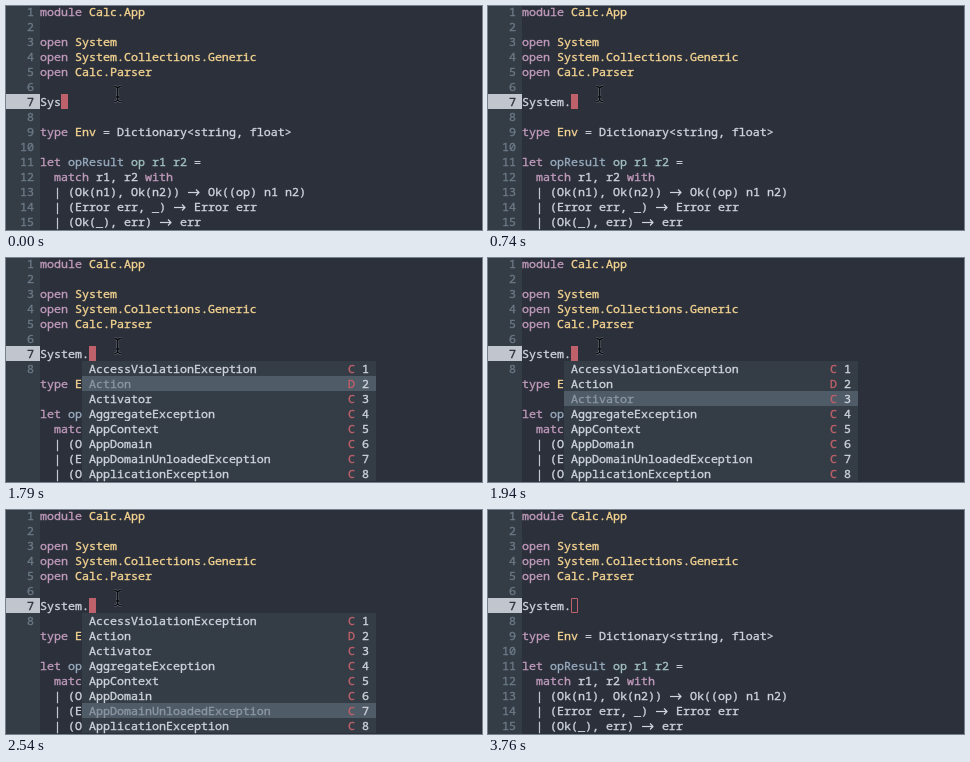
Write an HTML page with a canvas that moves like this. It is 476x224 px and loops after 3860 ms.

```html
<!DOCTYPE html>
<html lang="en">
<head>
<meta charset="utf-8">
<title>Code completion</title>
<style>
  html, body { margin: 0; width: 100%; height: 100%; overflow: hidden; background: #2b303b; }
  canvas { display: block; width: 476px; height: 224px; }
</style>
</head>
<body>
<canvas id="stage"></canvas>
<script>
const W = 476, H = 224, LOOP = 3860;
const COL = 7, ROW = 15, LEFT = 34, TOP = -2;
const FONT = '11.667px "Noto Sans Mono", "DejaVu Sans Mono", monospace';
const C = {
  bg: '#2b303b', gutter: '#343d46', fg: '#ced3dc', num: '#6b7985',
  key: '#c09abb', type: '#f5d491', fn: '#98abbe', arg: '#a3c1c0', red: '#bf616a',
  line: '#c0c5ce', menu: '#343d46', pick: '#4f5b66', dim: '#8c97a3'
};

// Each line is a list of [colour, text] runs.
const key = s => ['key', s], type = s => ['type', s], fg = s => ['fg', s];
const code = [
  [key('module '), type('Calc.App')],
  [],
  [key('open '), type('System')],
  [key('open '), type('System.Collections.Generic')],
  [key('open '), type('Calc.Parser')],
  [],
  [],
  [],
  [key('type '), type('Env'), fg(' = Dictionary<string, float>')],
  [],
  [key('let '), ['fn', 'opResult'], ['arg', ' op r1 r2'], fg(' =')],
  [key('  match'), fg(' r1, r2 '), key('with')],
  [fg('  | (Ok(n1), Ok(n2)) -> Ok((op) n1 n2)')],
  [fg('  | (Error err, _) -> Error err')],
  [fg('  | (Ok(_), err) -> err')]
];

const short = [['System', 'N'], ['SystemException', 'C']];
const members = [
  ['AccessViolationException', 'C'], ['Action', 'D'], ['Activator', 'C'],
  ['AggregateException', 'C'], ['AppContext', 'C'], ['AppDomain', 'C'],
  ['AppDomainUnloadedException', 'C'], ['ApplicationException', 'C']
];

const canvas = document.getElementById('stage');
const ctx = canvas.getContext('2d');
const dpr = window.devicePixelRatio || 1;
canvas.width = W * dpr;
canvas.height = H * dpr;

const lineTop = n => TOP + (n - 1) * ROW;

function rect(color, x, y, w, h) {
  ctx.fillStyle = color;
  ctx.fillRect(x, y, w, h);
}

// A hairline outline gives the type its medium weight.
function text(color, s, x, top) {
  ctx.fillStyle = ctx.strokeStyle = color;
  ctx.lineWidth = 0.35;
  ctx.fillText(s, x, top + 12);
  ctx.strokeText(s, x, top + 12);
}

function path(points, close) {
  ctx.beginPath();
  for (const [x, y] of points) ctx.lineTo(x, y);
  if (close) ctx.closePath();
}

function arrowGlyph(x, top) {
  const y = top + 8.5;
  ctx.strokeStyle = C.fg;
  ctx.lineWidth = 1.2;
  path([[x + 1, y], [x + 12, y]]);
  ctx.stroke();
  path([[x + 9, y - 3], [x + 12, y], [x + 9, y + 3]]);
  ctx.stroke();
}

function drawLine(runs, top) {
  let x = LEFT;
  for (const [color, s] of runs) {
    const at = s.indexOf('->');
    if (at < 0) {
      text(C[color], s, x, top);
    } else {
      text(C[color], s.slice(0, at), x, top);
      arrowGlyph(x + at * COL, top);
      text(C[color], s.slice(at + 2), x + (at + 2) * COL, top);
    }
    x += s.length * COL;
  }
}

function drawEditor(typed, menuOpen, focused) {
  rect(C.bg, 0, 0, W, H);
  rect(C.gutter, 0, 0, LEFT, H);
  rect(C.line, 0, lineTop(7), LEFT, ROW);
  code.forEach((runs, i) => {
    const n = i + 1, s = String(n), top = lineTop(n);
    if (!menuOpen || n < 9) text(n === 7 ? C.bg : C.num, s, 28 - s.length * COL, top);
    drawLine(runs, top);
  });
  const top = lineTop(7), x = LEFT + typed.length * COL;
  text(C.fg, typed, LEFT, top);
  if (focused) {
    rect(C.red, x, top, COL, ROW);
  } else {
    ctx.strokeStyle = C.red;
    ctx.lineWidth = 1;
    ctx.strokeRect(x + 0.5, top + 0.5, COL - 1, ROW - 1);
  }
}

function drawMenu(items, x, right, textX, pick) {
  items.forEach(([name, kind], i) => {
    const top = lineTop(8 + i), on = i === pick;
    rect(on ? C.pick : C.menu, x, top, right - x, ROW);
    text(on ? C.dim : C.fg, name, textX, top);
    text(C.red, kind, right - 4 * COL, top);
    text(C.fg, String(i + 1), right - 2 * COL, top);
  });
}

function drawBeam(x, y) {
  for (const [color, width] of [['rgba(150,156,166,.6)', 2.4], ['#0a0b0e', 1.3]]) {
    ctx.strokeStyle = color;
    ctx.lineWidth = width;
    ctx.beginPath();
    for (const d of [-1, 1]) {
      ctx.moveTo(x - 3.5, y + 7.5 * d);
      ctx.quadraticCurveTo(x, y + 7.5 * d, x, y + 5 * d);
      ctx.quadraticCurveTo(x, y + 7.5 * d, x + 3.5, y + 7.5 * d);
    }
    ctx.moveTo(x, y - 6);
    ctx.lineTo(x, y + 6);
    ctx.moveTo(x - 2, y + 3);
    ctx.lineTo(x + 2, y + 3);
    ctx.stroke();
  }
}

function drawPointer(x, y) {
  const shape = [[0, 0], [0, 16], [3.7, 12.6], [6.2, 18.5], [8.8, 17.4], [6.3, 11.6], [11.4, 11.4]];
  path(shape.map(([dx, dy]) => [x + dx, y + dy]), true);
  ctx.fillStyle = '#08090b';
  ctx.fill();
  ctx.strokeStyle = '#eceef1';
  ctx.lineWidth = 1.2;
  ctx.stroke();
}

function drawMouse(t) {
  if (t < 2830) drawBeam(111.7, 88);
  else if (t < 2980) drawBeam(135.7, 104);
  else if (t < 3120) drawPointer(284, 143);
  else if (t < 3270) drawPointer(338, 183);
}

function draw(t) {
  const hinting = t >= 150 && t < 740;
  const listing = t >= 1340 && t < 3760;
  const typed = t < 150 ? 'Sys' : t < 740 ? 'Syst' : 'System.';
  ctx.setTransform(dpr, 0, 0, dpr, 0, 0);
  ctx.font = FONT;
  ctx.textBaseline = 'alphabetic';
  ctx.lineJoin = 'round';
  drawEditor(typed, hinting || listing, t < 3760);
  if (hinting) drawMenu(short, LEFT, 321, LEFT, 0);
  if (listing) {
    const pick = t < 1790 ? 0 : Math.min(6, 1 + Math.floor((t - 1790) / 150));
    drawMenu(members, 76, 370, 83, pick);
  }
  drawMouse(t);
}

const start = performance.now();
function tick() {
  draw((performance.now() - start) % LOOP);
  requestAnimationFrame(tick);
}
tick();
</script>
</body>
</html>
```
